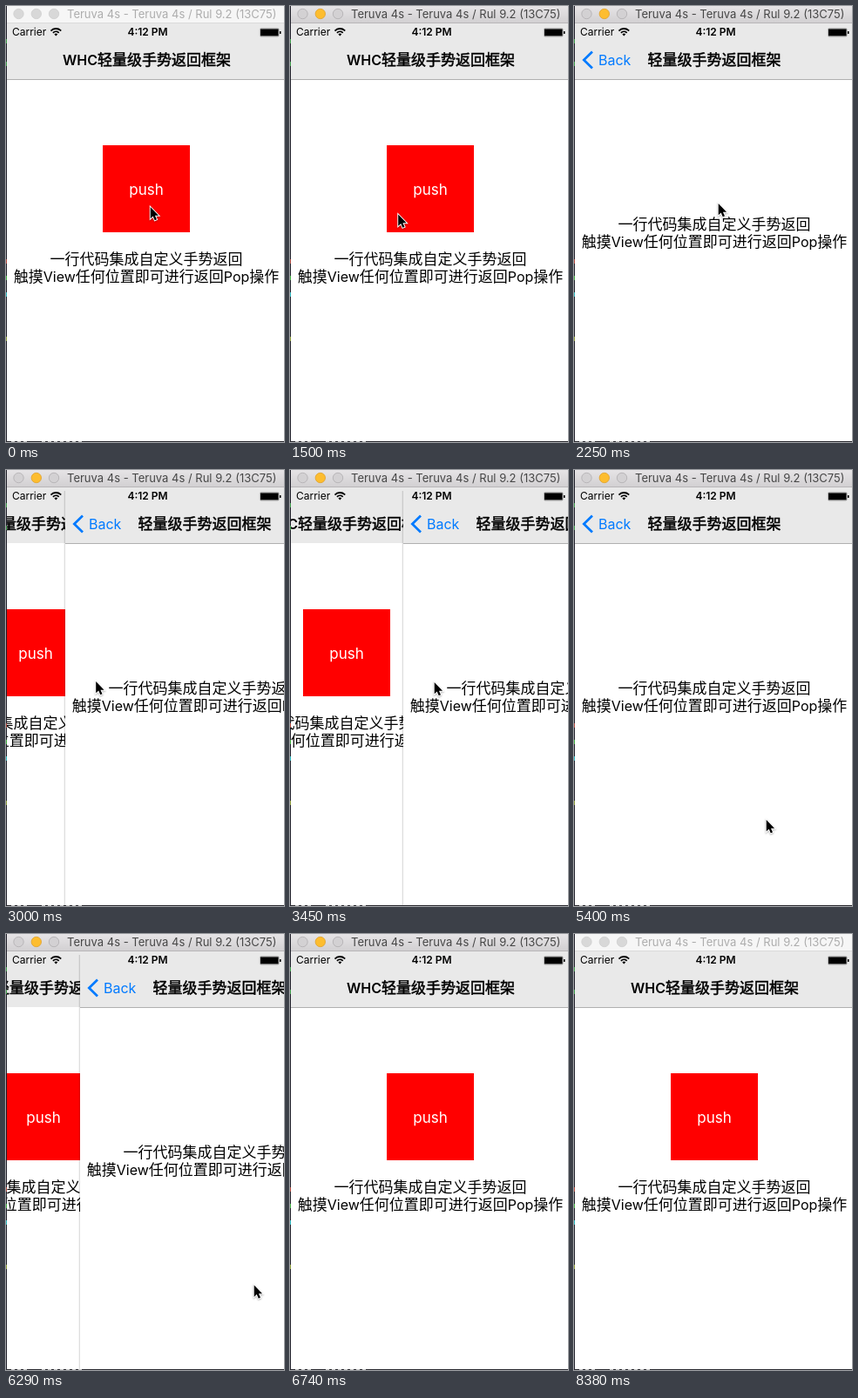
Recreate the animation shown at these times as an HTML page with a canvas. Size 319 px wide and 501 px high, loop 8480 ms.

```html
<!DOCTYPE html>
<html lang="zh">
<head>
<meta charset="utf-8">
<title>Swipe back demo</title>
<style>
html, body { margin: 0; width: 100%; height: 100%; overflow: hidden; background: #fff; }
canvas { display: block; width: 319px; height: 501px; }
</style>
</head>
<body>
<canvas id="stage" width="319" height="501"></canvas>
<script>
const ctx = document.getElementById('stage').getContext('2d');
const LOOP = 8480, STEP = 150, W = 320, MID = 161;
const LATIN = 'Inter, "Open Sans", sans-serif';
const HAN = '"Noto Sans CJK SC", "Noto Sans CJK", "Noto Sans CJK JP", sans-serif';
const BLUE = '#007aff';

// [time, x, y]
const pointer = [
  [0, 165, 231], [300, 87, 251], [1350, 87, 251], [1650, 160, 228], [1800, 165, 227],
  [2250, 165, 227], [2550, 40, 242], [3450, 165, 244], [3750, 225, 248], [4050, 205, 247],
  [4200, 187, 246], [4650, 187, 246], [5250, 218, 390], [5400, 220, 402],
  [5550, 200, 402], [6300, 305, 404], [6600, 316, 404], [6740, 345, 404]
];
// [time, left edge of the detail page]
const drag = [
  [0, W], [1950, 0], [2520, 0], [2550, 4], [3450, 129], [3750, 189], [4050, W],
  [4550, W], [4900, 0], [5550, 0], [6300, 105], [6600, W]
];
const pushes = [1600, 4550], PUSH_TIME = 350;

function at(keys, t, i) {
  const n = keys.findIndex(k => k[0] > t);
  if (n < 0) return keys[keys.length - 1][i];
  const a = keys[n - 1], b = keys[n];
  return a[i] + (b[i] - a[i]) * (t - a[0]) / (b[0] - a[0]);
}

const ease = k => k * k * (3 - 2 * k);

function rect(x, y, w, h, color) {
  ctx.fillStyle = color;
  ctx.fillRect(x, y, w, h);
}

function text(str, x, y, size, color, weight = 400, align = 'left') {
  ctx.font = `${weight} ${size}px ${LATIN}`;
  ctx.textAlign = align;
  ctx.fillStyle = color;
  ctx.fillText(str, x, y);
}

// Centred line of Chinese and Latin runs; bold Chinese is a medium weight
function mixed(str, cx, y, bold) {
  const runs = str.match(/[ -~]+|[^ -~]+/g).map(s => {
    const han = !/[ -~]/.test(s);
    const font = han ? `17px ${HAN}` : `${bold ? 600 : 400} 16px ${LATIN}`;
    ctx.font = font;
    return { s, han, font, w: ctx.measureText(s).width };
  });
  let x = cx - runs.reduce((sum, r) => sum + r.w, 0) / 2;
  ctx.textAlign = 'left';
  ctx.fillStyle = ctx.strokeStyle = '#000';
  ctx.lineWidth = 0.5;
  for (const r of runs) {
    ctx.font = r.font;
    ctx.fillText(r.s, x, y);
    if (bold && r.han) ctx.strokeText(r.s, x, y);
    x += r.w;
  }
}

function shifted(dx, alpha, draw) {
  ctx.save();
  ctx.translate(Math.round(dx), 0);
  ctx.globalAlpha = alpha;
  draw();
  ctx.restore();
}

function navBar(line = true) {
  rect(1, 20, W, 64, '#e9e9e9');
  if (line) rect(1, 84, W, 1, '#b0b0b0');
}

const rootTitle = () => mixed('WHC轻量级手势返回框架', MID + 0.5, 68, true);
const detailTitle = () => mixed('轻量级手势返回框架', MID, 68, true);
const backText = () => text('Back', 28, 68, 16, BLUE);

function chevron() {
  ctx.beginPath();
  ctx.moveTo(21, 52.5);
  ctx.lineTo(11.3, 62);
  ctx.lineTo(21, 71.5);
  ctx.strokeStyle = BLUE;
  ctx.lineWidth = 2.7;
  ctx.stroke();
}

function lines(y) {
  mixed('一行代码集成自定义手势返回', MID, y);
  mixed('触摸View任何位置即可进行返回Pop操作', MID, y + 20);
}

function rootBody() {
  rect(1, 84, W, 416, '#fff');
  rect(111, 160, 100, 100, '#f00');
  text('push', MID, 217, 17, '#fff', 400, 'center');
  lines(297);
}

function detailBody() {
  rect(1, 84, W, 416, '#fff');
  lines(257);
}

function rootPage(line) {
  rootBody();
  navBar(line);
  rootTitle();
}

function detailPage() {
  detailBody();
  navBar();
  chevron();
  backText();
  detailTitle();
}

function pushing(k) {
  const left = 1 - k;
  shifted(-W * 0.3 * k, 1, rootBody);
  shifted(W * left, 1, detailBody);
  navBar();
  shifted(-115 * k, left, rootTitle);
  shifted(160 * left, k, detailTitle);
  shifted(100 * left, k, backText);
  shifted(0, k, chevron);
}

function dragging(x) {
  shifted(Math.floor((x - W) / 2), 1, () => rootPage(false));
  shifted(x, 1, () => {
    detailPage();
    rect(-1, 24, 1, 476, 'rgba(0,0,0,0.04)');
    rect(0, 24, 1, 476, 'rgba(0,0,0,0.13)');
  });
}

function statusBar() {
  text('Carrier', 7, 34, 12, '#000');
  text('4:12 PM', 162.5, 34, 12, '#000', 600, 'center');
  ctx.strokeStyle = '#000';
  ctx.lineWidth = 1.8;
  for (const r of [4.6, 8]) {
    ctx.beginPath();
    ctx.arc(57.3, 34, r, -Math.PI * 0.76, -Math.PI * 0.24);
    ctx.stroke();
  }
  ctx.beginPath();
  ctx.moveTo(57.3, 34.6);
  ctx.arc(57.3, 34.2, 2.6, -Math.PI * 0.76, -Math.PI * 0.24);
  ctx.fillStyle = '#000';
  ctx.fill();
  ctx.strokeStyle = '#888';
  ctx.lineWidth = 0.6;
  ctx.beginPath();
  ctx.roundRect(291.4, 25.7, 21.8, 9.4, 1.5);
  ctx.stroke();
  rect(292, 26.4, 20.6, 8, '#000');
  rect(314, 29, 1.5, 3, '#000');
}

function titleBar(active) {
  const g = ctx.createLinearGradient(0, 0, 0, 20);
  g.addColorStop(0, active ? '#e6e4e6' : '#f6f6f6');
  g.addColorStop(1, active ? '#d1cfd1' : '#f6f6f6');
  rect(1, 0, W, 20, g);
  rect(1, 19, W, 1, active ? '#b8b6b8' : '#dadada');
  [14.5, 34.8, 55].forEach((x, i) => {
    const lit = active && i === 1;
    ctx.beginPath();
    ctx.arc(x, 9, 5.7, 0, Math.PI * 2);
    ctx.fillStyle = lit ? '#fdbd2f' : active ? '#d3d1d3' : '#d8d8d8';
    ctx.fill();
    ctx.strokeStyle = lit ? '#e0a12a' : active ? '#b0aeb0' : '#cfcfcf';
    ctx.lineWidth = 0.8;
    ctx.stroke();
  });
  text('Teruva 4s - Teruva 4s / Rul 9.2 (13C75)', 70, 14, 13, active ? '#464646' : '#adadad');
}

// Slivers of the window behind
function edges() {
  rect(0, 0, 1, 501, '#20202a');
  rect(0, 500, 319, 1, '#2a2a30');
  [[38, '#3c9c48'], [64, '#3c9c48'], [291, '#b0483c'], [310, '#3fae3f'],
   [329, '#28b4bc'], [380, '#8a9a38']].forEach(([y, c]) => rect(0, y, 1, 5, c));
  for (let x = 6; x < 85; x += 7) if (x < 22 || x > 38) rect(x, 500, 4, 1, '#c8c8c8');
}

function arrow(x, y) {
  ctx.save();
  ctx.translate(x + 0.7, y);
  ctx.scale(0.95, 0.95);
  ctx.beginPath();
  [[0, 0], [0, 14], [3.2, 11], [5.3, 16], [7.7, 15], [5.5, 10.2], [9.9, 10.2]]
    .forEach(([px, py]) => ctx.lineTo(px, py));
  ctx.closePath();
  ctx.shadowColor = 'rgba(0,0,0,0.3)';
  ctx.shadowBlur = 2;
  ctx.shadowOffsetY = 1;
  ctx.strokeStyle = '#fff';
  ctx.lineWidth = 2;
  ctx.stroke();
  ctx.shadowColor = 'transparent';
  ctx.fillStyle = '#000';
  ctx.fill();
  ctx.restore();
}

function screen(t) {
  const start = pushes.find(s => t >= s && t < s + PUSH_TIME);
  if (start !== undefined) return pushing(ease((t - start) / PUSH_TIME));
  if (t < pushes[0]) return rootPage();
  const x = at(drag, t, 1);
  if (x >= W) rootPage();
  else if (x <= 0) detailPage();
  else dragging(x);
}

function draw(t) {
  rect(0, 0, 319, 501, '#fff');
  ctx.save();
  ctx.beginPath();
  ctx.rect(1, 20, 318, 480);
  ctx.clip();
  screen(t);
  statusBar();
  ctx.restore();
  titleBar(t >= 1200 && t < 8380);
  edges();
  if (t < 6740) arrow(at(pointer, t, 1), at(pointer, t, 2));
}

const begin = performance.now();

function tick() {
  const t = (performance.now() - begin) % LOOP;
  draw(t < 6740 ? Math.floor(t / STEP) * STEP : t);
  requestAnimationFrame(tick);
}
tick();
</script>
</body>
</html>
```
